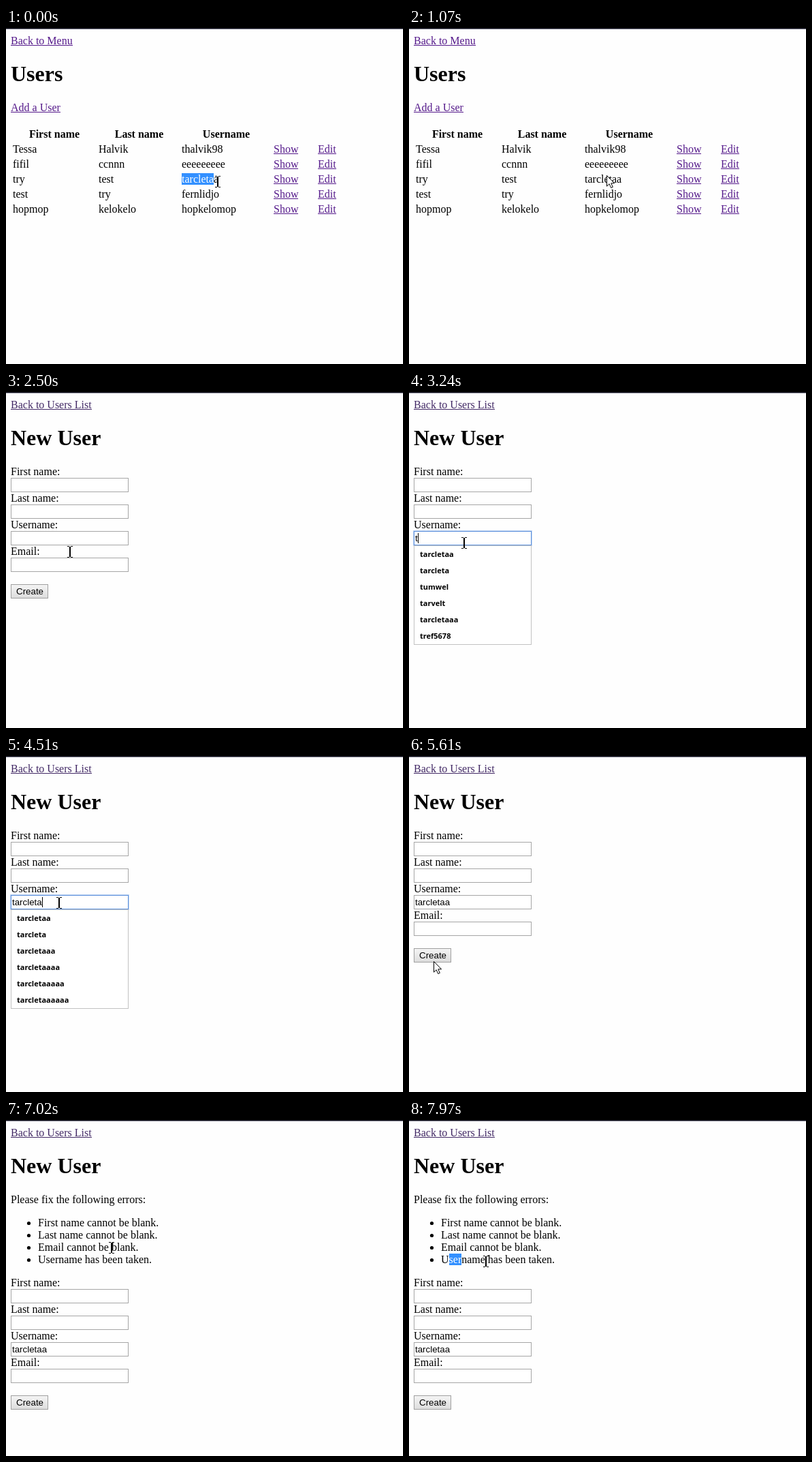
These frames come from a looping animation (583 px wide and 493 px high, 8 s). An HTML page with a canvas:

```html
<!DOCTYPE html>
<html lang="en">
<head>
<meta charset="utf-8">
<title>User form</title>
<style>
html, body { margin: 0; width: 100%; height: 100%; overflow: hidden; background: #fefefe; }
canvas { display: block; }
</style>
</head>
<body>
<canvas id="stage" width="583" height="493"></canvas>
<script>
const ctx = document.getElementById('stage').getContext('2d');
const LOOP = 8000;
const SERIF = '16px "Liberation Serif", serif';
const BOLD = 'bold 16px "Liberation Serif", serif';
const TITLE = 'bold 32px "Liberation Serif", serif';
const SANS = '13.333px "Liberation Sans", sans-serif';
const MENU = 'bold 11px "Open Sans", sans-serif';
const PURPLE = '#551a8b';
const NAME = 'tarcletaa';

const users = [
  ['Tessa', 'Halvik', 'thalvik98'],
  ['fifil', 'ccnnn', 'eeeeeeeee'],
  ['try', 'test', NAME],
  ['test', 'try', 'fernlidjo'],
  ['hopmop', 'kelokelo', 'hopkelomop']
];
const firstHints = [NAME, 'tarcleta', 'tumwel', 'tarvelt', 'tarcletaaa', 'tref5678'];
const laterHints = [2, 1, 3, 4, 5, 6].map(n => 'tarclet' + 'a'.repeat(n));

// Pointer poses: start time, shape, x, y
const pointer = [
  [0, 'beam', 311, 225], [120, 'beam', 313, 226], [250, 'beam', 314, 226], [380, 'arrow', 316, 226],
  [940, 'arrow', 290, 216], [1075, 'arrow', 190, 170], [1210, 'arrow', 98, 132], [1345, 'hand', 63, 118],
  [1790, 'beam', 72, 156], [1930, 'beam', 90, 215], [2070, 'beam', 100, 244],
  [2370, 'beam', 94, 234], [2510, 'beam', 85, 224], [2660, 'beam', 81, 221],
  [4370, 'beam', 79, 217], [4510, 'beam', 78, 215], [4660, 'beam', 92, 214], [4930, 'arrow', 326, 191],
  [5200, 'arrow', 250, 215], [5330, 'arrow', 120, 265], [5470, 'arrow', 46, 296], [5610, 'arrow', 36, 301],
  [5760, 'arrow', 36, 297], [5880, 'arrow', 52, 240], [6000, 'beam', 70, 188],
  [6150, 'beam', 56, 180], [6280, 'beam', 58, 188], [6420, 'beam', 62, 193], [6570, 'beam', 78, 191],
  [6720, 'beam', 105, 189], [6870, 'beam', 136, 188], [7020, 'beam', 155, 187],
  [7430, 'beam', 118, 198], [7560, 'beam', 66, 207], [7700, 'beam', 59, 208], [7840, 'beam', 78, 208],
  [7970, 'beam', 113, 207]
];
const typing = [[0, 0], [3240, 1], [3510, 2], [3660, 3], [3940, 4], [4080, 5],
  [4220, 6], [4370, 7], [4510, 8], [4660, 9]];

const at = (keys, t) => keys.reduce((found, key) => key[0] <= t ? key : found);

function box(x, y, w, h, color) {
  ctx.fillStyle = color;
  ctx.fillRect(x, y, w, h);
}

function frame(x, y, w, h, color) {
  ctx.strokeStyle = color;
  ctx.lineWidth = 1;
  ctx.strokeRect(x + .5, y + .5, w - 1, h - 1);
}

function text(str, x, y, font = SERIF, color = '#000', align = 'left') {
  ctx.font = font;
  ctx.fillStyle = color;
  ctx.textAlign = align;
  ctx.fillText(str, x, y);
  return ctx.measureText(str).width;
}

function link(str, x, y, color = PURPLE) {
  const w = text(str, x, y, SERIF, color);
  box(x, y + 1, Math.round(w), 1, color);
}

// Text with a highlighted span of characters
function marked(str, x, y, from, to) {
  text(str, x, y);
  if (to <= from) return;
  const left = Math.round(x + ctx.measureText(str.slice(0, from)).width);
  const right = Math.round(x + ctx.measureText(str.slice(0, to)).width);
  ctx.save();
  ctx.beginPath();
  ctx.rect(left, y - 14, right - left, 17);
  ctx.clip();
  box(left, y - 14, right - left, 17, '#3390ff');
  text(str, x, y, SERIF, '#fff');
  ctx.restore();
}

function listPage(t) {
  link('Back to Menu', 7, 24);
  text('Users', 7, 78, TITLE);
  link('Add a User', 7, 122);
  text('First name', 71, 161, BOLD, '#000', 'center');
  text('Last name', 195.5, 161, BOLD, '#000', 'center');
  text('Username', 323.5, 161, BOLD, '#000', 'center');
  users.forEach(([first, last, login], i) => {
    const y = 183 + 22 * i;
    text(first, 10, y);
    text(last, 136, y);
    const picked = i !== 2 || t >= 380 ? 0 : t < 120 ? 8 : 9;
    marked(login, 258, y, 0, picked);
    link('Show', 393, y);
    link('Edit', 458, y);
  });
}

function field(label, y, value, focused) {
  text(label, 7, y);
  box(7, y + 4, 173, 21, '#fff');
  if (focused) {
    frame(6, y + 3, 175, 23, '#c3d7f3');
    frame(7, y + 4, 173, 21, '#5b8fdc');
  } else {
    frame(7, y + 4, 173, 21, '#a6a6a6');
  }
  const w = text(value, 9, y + 19, SANS);
  if (focused) box(Math.round(9 + w), y + 7, 1, 15, '#000');
}

function button(y, pressed) {
  const fill = ctx.createLinearGradient(0, y, 0, y + 21);
  fill.addColorStop(0, pressed ? '#d6d6d6' : '#f5f5f5');
  fill.addColorStop(1, pressed ? '#eee' : '#dcdcdc');
  box(7, y, 55, 21, fill);
  frame(7, y, 55, 21, '#a0a0a0');
  text('Create', 15, y + 15, SANS);
}

function hints(names) {
  box(7, 225, 173, 146, '#fff');
  frame(7, 225, 173, 146, '#c2c2c2');
  names.forEach((name, i) => text(name, 16, 242 + 24 * i, MENU));
}

function errors(t) {
  text('Please fix the following errors:', 7, 122);
  ['First name cannot be blank.', 'Last name cannot be blank.',
    'Email cannot be blank.', 'Username has been taken.'].forEach((line, i) => {
    const y = 156 + 18 * i;
    ctx.beginPath();
    ctx.arc(33.5, y - 4.5, 2.6, 0, 7);
    ctx.fillStyle = '#000';
    ctx.fill();
    marked(line, 47, y, 1, i < 3 ? 0 : t >= 7970 ? 4 : t >= 7840 ? 2 : 0);
  });
}

function formPage(t) {
  const failed = t >= 5880;
  const top = failed ? 244 : 122;
  const focused = t >= 2800 && t < 5080;
  link('Back to Users List', 7, 24, '#432a66');
  text('New User', 7, 78, TITLE);
  if (failed) errors(t);
  field('First name:', top, '');
  field('Last name:', top + 39, '');
  field('Username:', top + 78, NAME.slice(0, at(typing, t)[1]), focused);
  field('Email:', top + 117, '');
  button(top + 160, t >= 5760 && !failed);
  if (t >= 3240 && t < 5080) hints(t < 3940 ? firstHints : laterHints);
}

const arrowShape = new Path2D('M.5 .5V16.2L4.1 12.7L6.7 18.5L9.3 17.4L6.8 11.8H11.6Z');
const handShape = new Path2D('M-2.5 13V2Q-2.5 .4 -1 .4T.6 2V7.5Q.8 6.4 2.2 6.5T3.8 8' +
  'Q4.2 7.1 5.5 7.3T7 8.9Q7.3 8.3 8.4 8.5T9.5 10V15Q9.5 17 8 19V21.5H-2.5V19.5' +
  'Q-4 17.5 -6 15L-8.2 12Q-8.6 10.5 -7.2 10T-4.8 11Z');

function drawPointer(shape, x, y) {
  ctx.save();
  ctx.translate(x, y);
  if (shape === 'beam') {
    box(-4, -8, 3, 1, '#000');
    box(1, -8, 3, 1, '#000');
    box(-1, -7, 2, 15, '#000');
    box(-4, 8, 3, 1, '#000');
    box(1, 8, 3, 1, '#000');
  } else {
    const path = shape === 'hand' ? handShape : arrowShape;
    ctx.fillStyle = '#fff';
    ctx.strokeStyle = '#000';
    ctx.lineWidth = 1;
    ctx.lineJoin = 'round';
    ctx.fill(path);
    ctx.stroke(path);
    if (shape === 'hand') [.6, 3.8, 7].forEach(px => box(px - .5, 8, 1, 4, '#000'));
  }
  ctx.restore();
}

function draw(now) {
  const t = now % LOOP;
  box(0, 0, 583, 493, '#fefefe');
  if (t < 1480) listPage(t);
  else formPage(t);
  box(0, 0, 583, 1, '#05050f');
  box(0, 1, 583, 1, '#8d8d98');
  drawPointer(...at(pointer, t).slice(1));
}

const start = performance.now();
function tick() {
  draw(performance.now() - start);
  requestAnimationFrame(tick);
}
tick();
</script>
</body>
</html>
```
